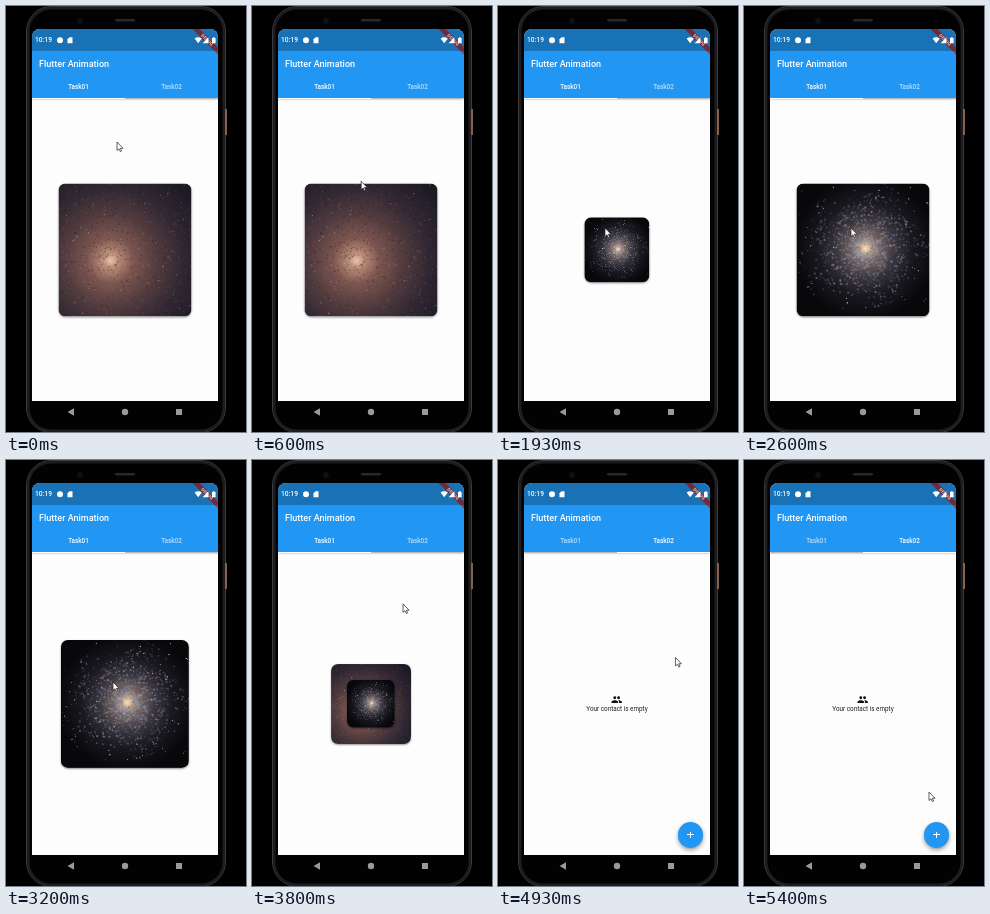
Animation, 240 px wide and 426 px high, one loop 5.47 s. Source, as an HTML page with a canvas:

```html
<!DOCTYPE html>
<html lang="en">
<head>
<meta charset="utf-8">
<title>Flutter Animation</title>
<style>
  html, body { margin: 0; width: 100%; height: 100%; overflow: hidden; background: #000; }
  body { position: relative; font: 6.35px Roboto, sans-serif; color: #fff; }
  div, canvas, svg { position: absolute; box-sizing: border-box; }
  svg.overlay { left: 0; top: 0; width: 240px; height: 426px; }
  #phone { left: 20px; top: 0; width: 200px; height: 427px; border-radius: 25px;
    border: 1.5px solid #3a393c; background: #020203; box-shadow: inset 0 0 0 2.5px #1d1c20; }
  #power { left: 219px; top: 103px; width: 2px; height: 26px; background: #8a6048; }
  #screen { left: 26px; top: 23px; width: 186px; height: 372px; overflow: hidden; background: #fdfdfd;
    border-radius: 8px 8px 0 0; }
  #pages { top: 70px; width: 372px; height: 302px; }
  .page { width: 186px; height: 302px; }
  .page + .page { left: 186px; }
  .page canvas { left: 93px; top: 151px; transform: translate(-50%, -50%); border-radius: 7px;
    box-shadow: 0 1px 2px rgba(0, 0, 0, .4); }
  #empty { width: 186px; top: 152px; text-align: center; line-height: 8px; color: #222; }
  #people { left: 87.3px; top: 141.3px; width: 11.4px; height: 11.4px; fill: #111; }
  #add { left: 153.8px; top: 269.3px; width: 25.4px; height: 25.4px; border-radius: 50%;
    background: #2196f3; box-shadow: 0 2px 4px rgba(0, 0, 0, .4); }
  #add::before, #add::after { content: ""; position: absolute; background: #fff; }
  #add::before { left: 9.5px; top: 12.2px; width: 6.4px; height: 1px; }
  #add::after { left: 12.2px; top: 9.5px; width: 1px; height: 6.4px; }
  #bar { width: 186px; height: 69px; background: #2196f3; box-shadow: 0 1px 2px rgba(0, 0, 0, .4); }
  #title { left: 7px; top: 29px; font-size: 9.05px; font-weight: 500; line-height: 13px; white-space: nowrap; }
  .tab { top: 48px; width: 93px; height: 21px; line-height: 21px; text-align: center; font-weight: 500; }
  #hover { left: 93px; top: 48px; width: 93px; height: 21px; background: rgba(120, 120, 120, .1); overflow: hidden; }
  #ripple { left: 52px; top: 15px; border-radius: 50%; background: #fff; transform: translate(-50%, -50%); }
  #line { top: 68.5px; width: 93px; height: 1px; background: #fff; }
  #debug { left: 186px; top: 0; transform: rotate(45deg); transform-origin: 0 0; }
  #debug div { left: -18.1px; top: 12.7px; width: 36.2px; height: 5.4px; background: rgba(183, 28, 28, .75);
    font-size: 4.6px; font-weight: 900; line-height: 5.6px; text-align: center; }
  #status { width: 186px; height: 22px; background: rgba(0, 0, 0, .25); }
  #clock { left: 3px; top: 6px; font-size: 6.7px; font-weight: 500; line-height: 10px; }
</style>
</head>
<body>
<div id="phone"></div>
<div id="power"></div>
<div id="screen">
  <div id="pages">
    <div class="page"><canvas id="dust"></canvas><canvas id="spiral"></canvas></div>
    <div class="page">
      <svg id="people" viewBox="0 0 24 24"><circle cx="8" cy="8" r="3"/><circle cx="16" cy="8" r="3"/>
        <path d="M1 19v-2.500c0-2.300 4.700-3.500 7-3.500s7 1.200 7 3.500V19zM16 13c2.300 0 7 1.200 7 3.500V19h-6v-2.500c0-1.500-.8-2.600-2-3.400z"/></svg>
      <div id="empty">Your contact is empty</div>
      <div id="add"></div>
    </div>
  </div>
  <div id="bar">
    <div id="title">Flutter Animation</div>
    <div id="hover"><div id="ripple"></div></div>
    <div class="tab" id="tab1">Task01</div>
    <div class="tab" id="tab2" style="left:93px">Task02</div>
    <div id="line"></div>
  </div>
  <div id="debug"><div>DEBUG</div></div>
  <div id="status"><div id="clock">10:19</div></div>
</div>
<svg class="overlay" viewBox="0 0 240 426">
  <rect x="109" y="13" width="20" height="2.500" rx="1.200" fill="#29292b"/>
  <circle cx="74" cy="15" r="3" fill="#101013"/>
  <g fill="#fff">
    <circle cx="54" cy="34.300" r="3"/>
    <path d="M63.500 31.300h3v6h-5v-4z"/>
    <path d="M188.600 32.600q3.600-2.600 7.200 0l-3.600 4.600z"/>
    <path d="M202.400 31.300v6h-5.800z"/>
    <path d="M206 32h1v-.8h1.600v.8h1v5.300H206z"/>
  </g>
  <g fill="#9a9a9c">
    <path d="M68 402.300v7.400l-6.500-3.700z"/>
    <circle cx="119" cy="406" r="3.200"/>
    <rect x="170" y="403" width="6" height="6"/>
  </g>
  <path id="cursor" d="M0 0V8.500L2 6.800 3.300 9.600 4.600 9 3.300 6.300H6Z" fill="#fff" stroke="#222" stroke-width=".7"/>
</svg>
<script>
const LOOP = 5470, CARD = 133;
const $ = id => document.getElementById(id);
const clamp = v => Math.min(1, Math.max(0, v));
const progress = (t, start, length) => clamp((t - start) / length);
const ease = p => p * p * (3 - 2 * p);

function seeded(seed) {
  return () => (seed = seed * 16807 % 2147483647) / 2147483647;
}

function openCard(id, x, y, radius, stops) {
  const canvas = $(id), c = canvas.getContext('2d');
  canvas.width = canvas.height = CARD * 2;
  c.scale(2, 2);
  const glow = c.createRadialGradient(x, y, 0, x, y, radius);
  stops.forEach(([at, color]) => glow.addColorStop(at, color));
  c.fillStyle = glow;
  c.fillRect(0, 0, CARD, CARD);
  return (px, py, r, color, alpha) => {
    c.globalAlpha = alpha;
    c.fillStyle = color;
    c.beginPath();
    c.arc(px, py, r, 0, 7);
    c.fill();
  };
}

function paintDust() {
  const rnd = seeded(71);
  const dot = openCard('dust', 52, 77, 105, [[0, '#e8c3a6'], [.09, '#b58874'], [.22, '#7d5650'],
    [.45, '#513b3e'], [.7, '#302732'], [1, '#1b1924']]);
  const tones = ['#17131f', '#b98263', '#5f5c85', '#100e18', '#94604f'];
  for (let i = 0; i < 2200; i++) {
    const a = rnd() * 6.283, r = 6 + rnd() * 107;
    dot(52 + r * Math.cos(a), 77 + r * Math.sin(a) * .8, .3 + rnd() * .6, tones[i % 5], .12 + rnd() * .25);
  }
  for (let i = 0; i < 70; i++) dot(rnd() * CARD, rnd() * CARD, .25 + rnd() * .35, '#eee0da', .3 + rnd() * .4);
}

function paintSpiral() {
  const rnd = seeded(29);
  const dot = openCard('spiral', 69, 65, 72, [[0, '#f6e2c0'], [.07, '#cdb092'], [.18, '#756561'],
    [.4, '#3b3740'], [.65, '#1a1920'], [1, '#08080b']]);
  const tones = ['#8f9cbb', '#b9aca4', '#66709a', '#8d7268'];
  for (let arm = 0; arm < 5; arm++) {
    for (let i = 0; i < 420; i++) {
      const u = rnd(), r = 7 * Math.exp(2.15 * u), spread = 2 + r * .27;
      const a = arm * 1.257 - 1.9 + u * 4.6;
      dot(69 + r * Math.cos(a) + (rnd() + rnd() - 1) * spread, 65 + r * Math.sin(a) * .93 + (rnd() + rnd() - 1) * spread,
        .3 + rnd() * .9, tones[i % 4], .15 + rnd() * .35);
    }
  }
  for (let i = 0; i < 75; i++) dot(rnd() * CARD, rnd() * CARD, .25 + rnd() * .45, '#e6e2e4', .4 + rnd() * .5);
}

// time, x, y
const cursorPath = [[0, 111, 136], [350, 111, 136], [900, 107, 222], [3300, 107, 222],
  [3800, 151, 144], [4300, 171, 82], [4700, 171, 82], [5200, 185, 332], [LOOP, 185, 332]];

function cursorAt(t) {
  const i = cursorPath.findIndex(k => k[0] > t);
  const [t0, x0, y0] = cursorPath[i - 1], [t1, x1, y1] = cursorPath[i];
  const p = (t - t0) / (t1 - t0);
  return [x0 + (x1 - x0) * p, y0 + (y1 - y0) * p];
}

function resize(id, scale) {
  const style = $(id).style;
  style.width = style.height = CARD * scale + 'px';
  style.visibility = scale > 0 ? 'visible' : 'hidden';
}

function draw(t) {
  resize('dust', 1 - progress(t, 1400, 1000) + progress(t, 3200, 1000));
  resize('spiral', progress(t, 1440, 1000) - progress(t, 3165, 1000));

  const slide = ease(progress(t, 4560, 300));
  $('pages').style.left = -186 * slide + 'px';
  $('line').style.left = 93 * slide + 'px';
  $('tab1').style.color = `rgba(255,255,255,${1 - .3 * slide})`;
  $('tab2').style.color = `rgba(255,255,255,${.7 + .3 * slide})`;

  const [x, y] = cursorAt(t);
  $('cursor').setAttribute('transform', `translate(${x} ${y})`);
  $('hover').style.opacity = x > 119 && y > 71 && y < 93 ? 1 : 0;
  const ripple = $('ripple').style;
  ripple.width = ripple.height = 110 * progress(t, 4530, 300) + 'px';
  ripple.opacity = .12 * (1 - progress(t, 4700, 200));
}

function frame() {
  draw(performance.now() % LOOP);
  requestAnimationFrame(frame);
}

paintDust();
paintSpiral();
frame();
</script>
</body>
</html>
```
